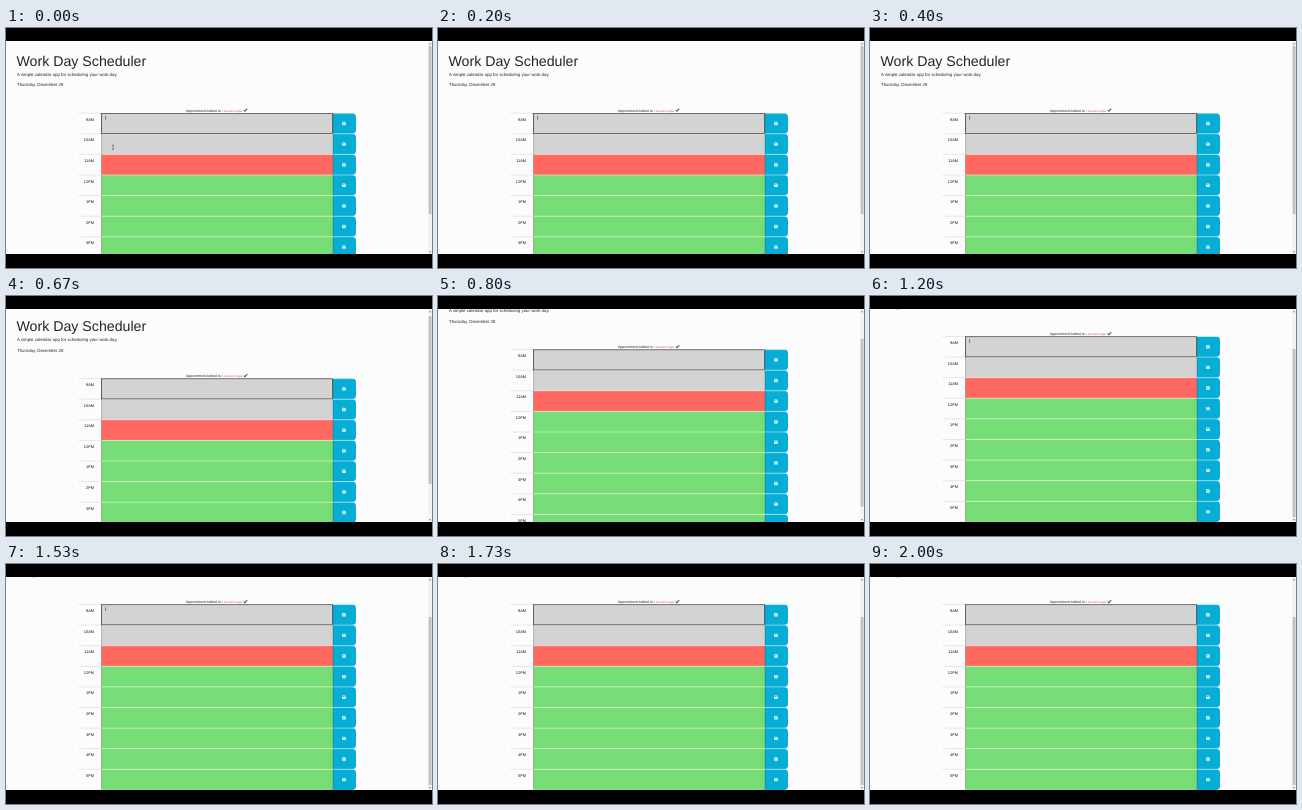
Recreate the animation shown at these times as an HTML page. Size 426 px wide and 240 px high, loop 2070 ms.

```html
<!DOCTYPE html>
<html lang="en">
<head>
<meta charset="utf-8">
<title>Work Day Scheduler</title>
<style>
  html, body { margin: 0; width: 100%; height: 100%; overflow: hidden; background: #000; }
  svg { display: block; width: 100%; height: 100%; }
  text { font-family: "Liberation Sans", Arial, sans-serif; fill: #212529; text-rendering: geometricPrecision; }
  .small { font-size: 4.36px; }
  .hour { font-size: 3.9px; text-anchor: end; fill: #111; }
  .code { font-family: "Liberation Mono", "DejaVu Sans Mono", monospace; font-size: 2.8px; fill: #d63384; }
</style>
</head>
<body>
<svg viewBox="0 0 426 240">
  <defs>
    <clipPath id="window"><rect y="13" width="426" height="213"/></clipPath>
    <g id="disk">
      <path d="M-1.7-1.7H.9L1.7-.9V1.7H-1.7Z" fill="#fff"/>
      <path d="M-1-1.1H.6V-.3H-1Z" fill="#06aed5"/>
      <circle cy=".8" r=".5" fill="#06aed5"/>
    </g>
  </defs>
  <rect width="426" height="240"/>
  <g clip-path="url(#window)">
    <rect y="13" width="426" height="213" fill="#fcfcfd"/>
    <g id="page">
      <text x="10.4" y="38" font-size="14.2">Work Day Scheduler</text>
      <text class="small" x="11" y="47.9">A simple calendar app for scheduling your work day.</text>
      <text class="small" x="11" y="58.2">Thursday, December 28</text>
      <text x="180" y="83.5" font-size="3.54">Appointment Added to</text>
      <text class="code" x="216" y="83.5">localStorage</text>
      <path d="M237.7 82.2L238.9 83.3L241.3 80.7" fill="none" stroke="#23823a" stroke-width="1.1"/>
      <g id="rows"></g>
      <rect x="95.6" y="85.4" width="230.9" height="20.1" fill="none" stroke="#444" stroke-width=".75"/>
      <path id="caret" d="M99.6 88V91.6" stroke="#333" stroke-width=".6"/>
    </g>
    <path id="pointer" d="M106.2 117.2H107.8M107 117.2V121.6M106.2 121.6H107.8" stroke="#444" stroke-width=".6"/>
    <rect x="422" y="13" width="4" height="213" fill="#f3f3f3"/>
    <path d="M423 16.2L424.1 14.8L425.2 16.2ZM423 223.3L424.1 224.7L425.2 223.3Z" fill="#777"/>
    <rect id="thumb" x="422.7" y="18" width="2.8" height="168" fill="#c1c1c1"/>
  </g>
</svg>
<script>
  const LOOP = 2070, STEP = LOOP / 31;
  const SCROLL = { start: 628, length: 270, distance: 44.7, thumb: 35 };
  const ROW = { top: 85.2, height: 20.6 };
  const hours = ["9AM", "10AM", "11AM", "12PM", "1PM", "2PM", "3PM", "4PM", "5PM"];
  const currentHour = 2;
  const $ = id => document.getElementById(id);

  function rowMarkup(label, i) {
    const y = ROW.top + i * ROW.height, h = ROW.height, bottom = y + h;
    const fill = i < currentHour ? "#d3d3d3" : i === currentHour ? "#ff6961" : "#77dd77";
    return `
      <path d="M73 ${y}H95.5" stroke="#aaa" stroke-width=".4" stroke-dasharray="1 .5"/>
      <text class="hour" x="88" y="${y + 7.5}">${label}</text>
      <rect x="95.5" y="${y}" width="231.5" height="${h}" fill="${fill}"/>
      <path d="M327 ${y}H346a4 4 0 0 1 4 4V${bottom - 4}a4 4 0 0 1 -4 4H327Z" fill="#06aed5"/>
      <path d="M95.5 ${y}H350" stroke="#fff" stroke-width=".45"/>
      <path d="M95.6 ${y}V${bottom}M327 ${y}V${bottom}" stroke="#333" stroke-width=".3"/>
      <use href="#disk" x="338" y="${y + h / 2}"/>`;
  }

  $("rows").innerHTML = hours.map(rowMarkup).join("");

  function easeInOut(p) {
    const c = Math.min(1, Math.max(0, p));
    return c * c * (3 - 2 * c);
  }

  function draw(time) {
    const t = Math.floor((time % LOOP) / STEP + 0.02) * STEP;
    const p = easeInOut((t - SCROLL.start) / SCROLL.length);
    $("page").setAttribute("transform", `translate(0 ${-SCROLL.distance * p})`);
    $("thumb").setAttribute("y", 18 + SCROLL.thumb * p);
    $("caret").style.display = t % 1068 < 590 ? "" : "none";
    $("pointer").style.display = t < 70 ? "" : "none";
  }

  const begin = performance.now();
  function tick() {
    draw(performance.now() - begin);
    requestAnimationFrame(tick);
  }
  tick();
</script>
</body>
</html>
```
